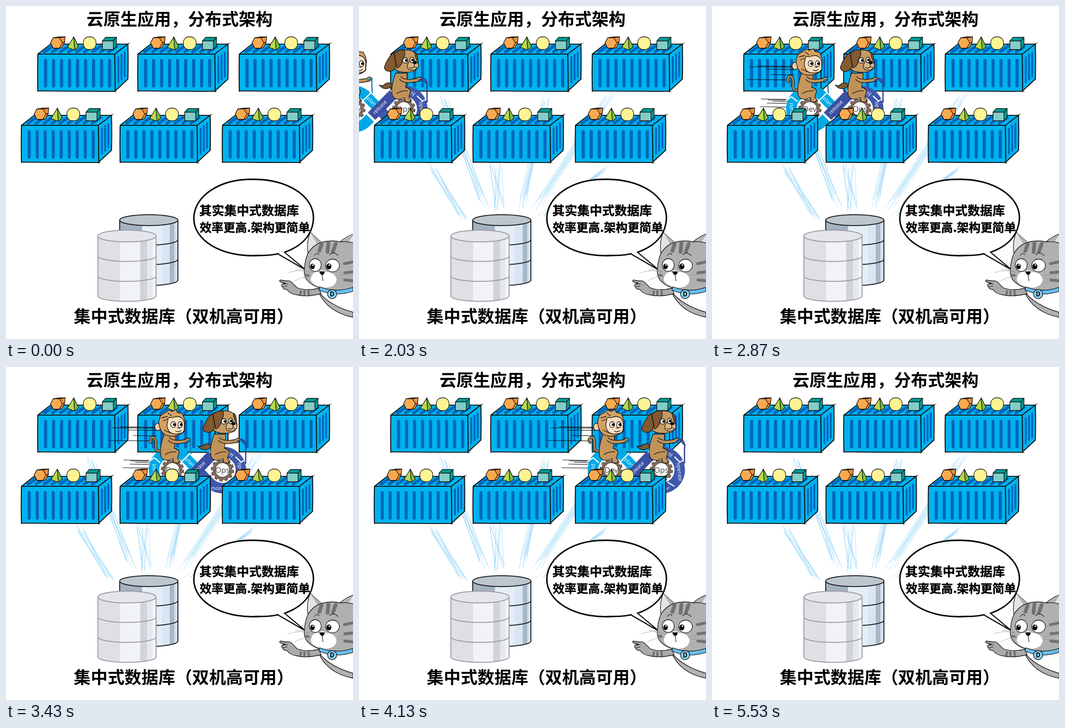
Animation of 763 by 734 pixels, one loop 5950 ms. Source, as an HTML page:

```html
<!DOCTYPE html>
<html lang="zh-CN">
<head>
<meta charset="utf-8">
<title>云原生应用与集中式数据库</title>
<style>
  html, body { margin: 0; width: 100%; height: 100%; overflow: hidden; background: #fff; }
  svg { display: block; width: 100vw; height: 100vh; }
  text { font-family: "Noto Sans CJK SC", "Noto Sans CJK", "Noto Sans CJK JP", sans-serif; }
  .title { font-size: 37.2px; font-weight: 700; }
  .hand { font-weight: 900; stroke: #000; stroke-width: .4; }
  .label { font: 11.5px "Open Sans", sans-serif; fill: #fff; text-anchor: middle; }
  .hub { font: 17px "Open Sans", sans-serif; fill: #444; text-anchor: middle; }
  .ink { stroke: #111; stroke-width: 1.3; stroke-linejoin: round; stroke-linecap: round; }
  .line { fill: none; stroke: #111; stroke-width: 1.2; stroke-linecap: round; }
</style>
</head>
<body>
<svg viewBox="0 0 763 734" preserveAspectRatio="none">
  <defs>
    <linearGradient id="pale">
      <stop offset=".38" stop-color="#dee0e5"/>
      <stop offset=".38" stop-color="#f2f3f8"/><stop offset=".73" stop-color="#f2f3f8"/>
      <stop offset=".73" stop-color="#d0d4da"/><stop offset=".84" stop-color="#d0d4da"/>
      <stop offset=".84" stop-color="#e6e8ee"/><stop offset=".94" stop-color="#e6e8ee"/>
      <stop offset=".94" stop-color="#f2f3f8"/>
    </linearGradient>
    <linearGradient id="steel">
      <stop offset=".38" stop-color="#a5b3c1"/>
      <stop offset=".38" stop-color="#e5eef8"/><stop offset=".73" stop-color="#e5eef8"/>
      <stop offset=".73" stop-color="#d9e5f2"/><stop offset=".86" stop-color="#d9e5f2"/>
      <stop offset=".86" stop-color="#a9b8c8"/><stop offset=".94" stop-color="#a9b8c8"/>
      <stop offset=".94" stop-color="#d3dfeb"/>
    </linearGradient>

    <g id="container">
      <path d="M0 0L28-22H198V55L169 82H0Z" fill="#00b3ef"/>
      <path id="ridges" fill="none" stroke="#0067bd" stroke-width="7" stroke-linecap="round"/>
      <path id="sideRidges" fill="none" stroke="#0067bd" stroke-width="4" stroke-linecap="round"/>
      <path class="line" style="stroke-width:2.2"
        d="M0 82Q-1 40 0 0L28-22H198M0 0H169L199-23M198-22Q199 20 198 55L169 82M169 0Q170 40 170 83M0 81Q80 82 170 82"/>
      <path class="line" style="stroke-width:.8" d="M198-22L203-25M170 82L174 83"/>
      <g class="ink">
        <path d="M28-25L34-36 47-38 60-38 59-26 53-14 40-12 34-13Z" fill="#f18b35"/>
        <path d="M28-25L34-36H47L54-25 47-13H34Z" fill="#f9aa50"/>
        <path d="M47-36L60-38M54-25L59-26" fill="none"/>
        <path d="M79-38L65-15 81-9Z" fill="#b8d94c"/>
        <path d="M79-38L81-9 90-16Z" fill="#7fbd45"/>
        <rect x="100" y="-38" width="28" height="28" rx="12.5" fill="#fff494"/>
        <path d="M142-29L149-37H173V-18L166-10H142Z" fill="#009b93"/>
        <path d="M142-29H166V-10H142Z" fill="#83cdc9"/>
        <path d="M166-29L173-37" fill="none"/>
      </g>
    </g>

    <g id="gear">
      <circle r="27" fill="#fff"/>
      <circle r="22" fill="none" stroke="#4b3d34" stroke-width="7" pathLength="24" stroke-dasharray="1.1 .9"/>
      <circle r="18.5" fill="#fff" stroke="#4b3d34" stroke-width="6.5"/>
      <circle r="22" fill="none" stroke="#806c5d" stroke-width="5" pathLength="24" stroke-dasharray=".8 1.2" stroke-dashoffset="-.15"/>
      <circle r="18.5" fill="none" stroke="#806c5d" stroke-width="4.5"/>
    </g>

    <g id="riderBody" class="ink">
      <path d="M-17 148Q-29 180-24 198Q-20 206-9 206L2 202 4 211 13 212 17 207 12 201 16 187Q13 181 5 179L8 160 8 148Z"/>
      <path d="M-6 156Q4 165 29 160Q38 153 40 160Q38 167 28 167Q2 173-8 162"/>
      <path d="M-15 193Q-5 186 9 187" fill="none"/>
    </g>
  </defs>

  <text class="title" x="177" y="43">云原生应用，分布式架构</text>
  <g id="rays" fill="none" stroke="#7fcdf6" stroke-width=".9"></g>
  <g id="upper"></g>

  <g id="bike">
    <path id="speed" class="line"/>
    <g fill="none" stroke-width="23">
      <path d="M81 200L55 227 81 254A40 40 0 1 0 81 200" stroke="#3f58ab"/>
      <path d="M55 227L29 200A40 40 0 1 0 29 254L36 247" stroke="#00a9e6"/>
      <path d="M39 243L84 197" stroke="#3b4fa3"/>
      <path d="M-9 174L7 187-6 200M-54 210L-40 200-27 211M-36 239L-26 254-44 256M39 190L28 201 15 213M139 198L151 210 162 203M92 174L82 187 94 200M124 254L139 263" stroke="#fff" stroke-width="2.5"/>
    </g>
    <g id="labels"></g>
    <use href="#gear" y="227"/><use href="#gear" x="110" y="227"/>
    <text class="hub" y="233">Dev</text><text class="hub" x="110" y="233">Ops</text>

    <g id="monkey" transform="translate(-1)">
      <path class="line" d="M-18 184Q-36 190-36 175Q-33 158-42 155Q-51 158-46 166" style="stroke-width:6"/>
      <path class="line" d="M-18 184Q-36 190-36 175Q-33 158-42 155Q-51 158-46 166" style="stroke:#b98a55;stroke-width:3.5"/>
      <use href="#riderBody" fill="#c4955c"/>
      <path d="M30 164L41 160Q40 178 42 192" fill="none" stroke="#147ca9" stroke-width="2.6"/>
      <g class="ink">
        <ellipse cx="-31" cy="132" rx="7" ry="8" fill="#f2d0a6"/>
        <path d="M-29 119L-25 107-14 100-7 95 0 98 9 94 12 100 22 102 26 110 29 121 27 142Q12 155-6 152Q-28 149-29 119Z" fill="#d3a064"/>
        <path d="M-9 118Q-10 109 0 112Q14 106 22 113Q29 120 27 132Q29 146 15 147Q-5 150-9 137Q-13 129-9 118Z" fill="#f8dfc0"/>
        <path d="M-22 112L-10 109M-20 119L-10 115M-17 139L-5 145M-9 101L-1 108" fill="none"/>
        <ellipse cx="3" cy="127" rx="5.5" ry="6.5" fill="#fff"/><ellipse cx="18" cy="127" rx="5" ry="6.5" fill="#fff"/>
        <path d="M12 134L17 135M8 141Q15 145 20 140" fill="none"/>
      </g>
      <circle cx="5" cy="127" r="3"/><circle cx="20" cy="127" r="3"/>
    </g>

    <g id="dog" transform="translate(109)">
      <path class="ink" d="M-25 177Q-41 189-53 174Q-45 178-39 171Q-31 166-24 174Z" fill="#7d5a33"/>
      <use href="#riderBody" fill="#c09259"/>
      <path d="M33 164L43 159Q54 163 52 180L52 213M41 160L54 174" fill="none" stroke="#34458f" stroke-width="2.8"/>
      <g class="ink">
        <path d="M-24 110Q-18 96 2 97Q27 95 29 113Q35 125 32 135Q26 147 5 146Q-19 147-24 130Z" fill="#c79a63"/>
        <path d="M-20 104Q-10 95 2 97Q6 108-2 118Q-3 132-14 137Z" fill="#84592f"/>
        <path d="M10 127Q13 120 23 121Q35 123 33 134Q27 143 15 141Q6 138 10 127Z" fill="#d9b887"/>
        <path d="M-21 102Q-34 112-42 135Q-41 145-29 144Q-17 143-16 128Z" fill="#84592f"/>
        <path d="M28 103Q33 113 31 121Q26 115 25 102Z" fill="#84592f"/>
        <ellipse cx="4" cy="120" rx="5.5" ry="6" fill="#fff"/><ellipse cx="19" cy="119" rx="4.5" ry="6" fill="#fff"/>
        <ellipse cx="25" cy="125" rx="4" ry="2.5" fill="#111"/>
        <path d="M24 128V134Q19 139 13 135M24 134L30 136" fill="none"/>
      </g>
      <circle cx="6" cy="120" r="2.8"/><circle cx="20" cy="119" r="2.7"/>
    </g>
  </g>

  <g id="lower"></g>

  <g id="databases" stroke-width="2">
    <g stroke="#15191e">
      <path d="M250 472V604A64 12 0 0 0 378 604V472" fill="url(#steel)"/>
      <path d="M250 515A64 12 0 0 0 378 515M250 558A64 12 0 0 0 378 558" fill="none"/>
      <ellipse cx="314" cy="472" rx="64" ry="12" fill="#bdc5ce"/>
    </g>
    <g stroke="#9b9ba1">
      <path d="M202 507V639A64 12 0 0 0 330 639V507" fill="url(#pale)"/>
      <path d="M202 551A64 12 0 0 0 330 551M202 595A64 12 0 0 0 330 595" fill="none"/>
      <ellipse cx="266" cy="507" rx="64" ry="13" fill="#e5e6eb"/>
    </g>
  </g>
  <text class="title" x="149" y="698">集中式数据库（双机高可用）</text>

  <g id="cat">
    <path d="M689 625Q706 655 763 684V620Z" fill="#fff"/>
    <path class="ink" d="M686 628Q710 660 763 675V686Q706 675 686 628Z" fill="#b2b2b2"/>
    <path class="ink" d="M603 604L617 606Q626 604 632 613L640 621Q662 629 688 622L693 634Q662 642 641 637Q624 635 618 625Q609 625 608 619Q603 616 609 612L614 611 603 608Q600 606 603 604Z" fill="#aaa"/>
    <path d="M649 627L647 637M656 627L656 638M665 627L666 638" stroke="#6b6b6b" stroke-width="4"/>
    <path class="line" d="M609 613L619 612M609 619L618 617"/>
    <path class="ink" d="M664 546Q660 520 669 499L696 523ZM733 521Q748 508 765 502V526Z" fill="#e4e4e4"/>
    <path d="M669 499L696 523 686 527ZM733 521L765 502 752 522Z" fill="#b2b2b2"/>
    <path class="ink" d="M664 545Q676 526 694 521Q714 515 735 520Q752 518 765 523V624Q727 636 691 622Q653 609 656 582Q657 560 664 545Z" fill="#b0b0b0"/>
    <path d="M670 603Q672 585 688 586Q695 579 704 586Q723 587 727 602Q726 620 702 621Q673 617 670 603Z" fill="#fff"/>
    <g stroke="#717171" stroke-linecap="round" fill="none">
      <path d="M694 525L689 540M709 522L707 542M725 524L719 541" stroke-width="8"/>
      <path d="M744 568L763 564M745 588L763 586M745 604L763 606" stroke-width="6"/>
      <path d="M658 593L665 594" stroke-width="5"/>
    </g>
    <g class="ink" fill="#fff">
      <ellipse cx="680" cy="571" rx="13" ry="14"/><ellipse cx="718" cy="572" rx="15" ry="14"/>
    </g>
    <ellipse cx="674" cy="574" rx="5" ry="6"/><ellipse cx="710" cy="574" rx="5.5" ry="6.5"/>
    <circle cx="675" cy="571" r="1.7" fill="#fff"/><circle cx="711" cy="571" r="1.8" fill="#fff"/>
    <path d="M689 585H701Q700 592 695 593Q690 591 689 585Z"/>
    <path class="line" d="M695 592L697 606M678 550Q683 542 688 548M712 548Q720 540 730 550"/>
    <path class="line" d="M620 588Q643 580 666 586M635 606Q650 596 672 596M637 581Q652 580 667 588M731 594L763 589M730 600L763 602" style="stroke:#888;stroke-width:.7"/>
    <path class="ink" d="M690 619Q725 633 763 620V629Q722 642 688 626Z" fill="#69bdf0"/>
    <circle class="ink" cx="717" cy="635" r="10" fill="#88cef5"/>
    <text x="717" y="640" font-size="14" font-weight="700" text-anchor="middle">D</text>
  </g>

  <g id="bubble">
    <path d="M612 543L655 579 598 546Q583 550 553 550C473 554 412 516 413 467C414 419 469 381 543 382C618 381 678 419 676 469C674 506 649 530 612 543Z" fill="#fff" stroke="#090909" stroke-width="3.3" stroke-linejoin="round"/>
    <path d="M598 546L655 579 612 543" fill="#fff" stroke="#111" stroke-width="1.5"/>
    <text class="hand" x="425" y="461" font-size="27.4">其实集中式数据库</text>
    <text class="hand" x="426" y="498" font-size="26">效率更高.架构更简单</text>
  </g>
</svg>
<script>
const LOOP = 5950, STEP = 70;
const RAYS_START = 350, RAY_STEPS = 9;
const RIDE_START = 1540, RIDE_END = 5530, RIDE_FROM = -143.5, RIDE_STRIDE = 18.87;
const el = id => document.getElementById(id);
const repeat = (n, make) => Array.from({ length: n }, (_, i) => make(i)).join("");

let seed = 7;
const random = () => (seed = seed * 16807 % 2147483647) / 2147483647;
const jitter = size => (random() - .5) * size;

el("ridges").setAttribute("d", repeat(9, i => {
  const x = 17 + i * 17.6;
  return `M${x} 14V70M${x - 2} -5l17 -12`;
}));
el("sideRidges").setAttribute("d", repeat(3, i => {
  const depth = 8 + i * 7;
  return `M${169 + depth} ${13 - depth * .76}V${70 - depth * .93}`;
}));

const row = (xs, y) => xs.map(x => `<use href="#container" x="${x}" y="${y}"/>`).join("");
el("upper").innerHTML = row([70, 290, 513], 106);
el("lower").innerHTML = row([34, 251, 476], 263);

// A bundle of loosely parallel sketch strokes
function bundle([x1, y1, x2, y2, spread]) {
  return repeat(10, () => {
    const a = random() * .15, b = 1 - random() * .15;
    const dx = x2 - x1, dy = y2 - y1;
    const from = x1 + dx * a + jitter(spread), to = x1 + dx * b + jitter(spread);
    return `<path d="M${from} ${y1 + dy * a}L${to} ${y1 + dy * b}" opacity="${.5 + random() * .4}"/>`;
  });
}
el("rays").innerHTML = [
  [158, 347, 234, 478, 20], [180, 191, 278, 450, 22], [300, 340, 312, 455, 28],
  [410, 193, 358, 452, 22], [554, 193, 384, 452, 22], [552, 350, 397, 465, 18]
].map(bundle).join("");

el("speed").setAttribute("d", [
  [132, -115, -34], [134, -133, -30], [139, -96, -35], [151, -86, -35], [162, -139, -51],
  [205, -107, -50], [207, -92, -44], [210, -82, -48], [214, -94, -52], [222, -109, -45]
].map(([y, from, to]) => `M${from} ${y}L${to} ${y + .8}`).join(""));

el("labels").innerHTML = [
  ["build", -41, 227, -90], ["plan", 39, 210, 46], ["release", 57, 223, -46],
  ["deploy", 118, 188, 18], ["operate", 150, 231, 84], ["monitor", 106, 267, 0], ["code", -20, 261, 28]
].map(([word, x, y, turn]) =>
  `<text class="label" dy="4" transform="translate(${x} ${y}) rotate(${turn})">${word}</text>`).join("");

function draw(now) {
  const time = Math.floor((now % LOOP) / STEP) * STEP;
  const rayStep = (time - RAYS_START) / STEP + 1;
  el("rays").setAttribute("opacity", Math.max(0, Math.min(1, rayStep / RAY_STEPS)));

  const riding = time >= RIDE_START && time < RIDE_END;
  const x = RIDE_FROM + RIDE_STRIDE * (time - RIDE_START) / STEP;
  el("bike").setAttribute("visibility", riding ? "visible" : "hidden");
  el("bike").setAttribute("transform", `translate(${x})`);
}

const start = performance.now();
function tick() {
  draw(performance.now() - start);
  requestAnimationFrame(tick);
}
tick();
</script>
</body>
</html>
```
